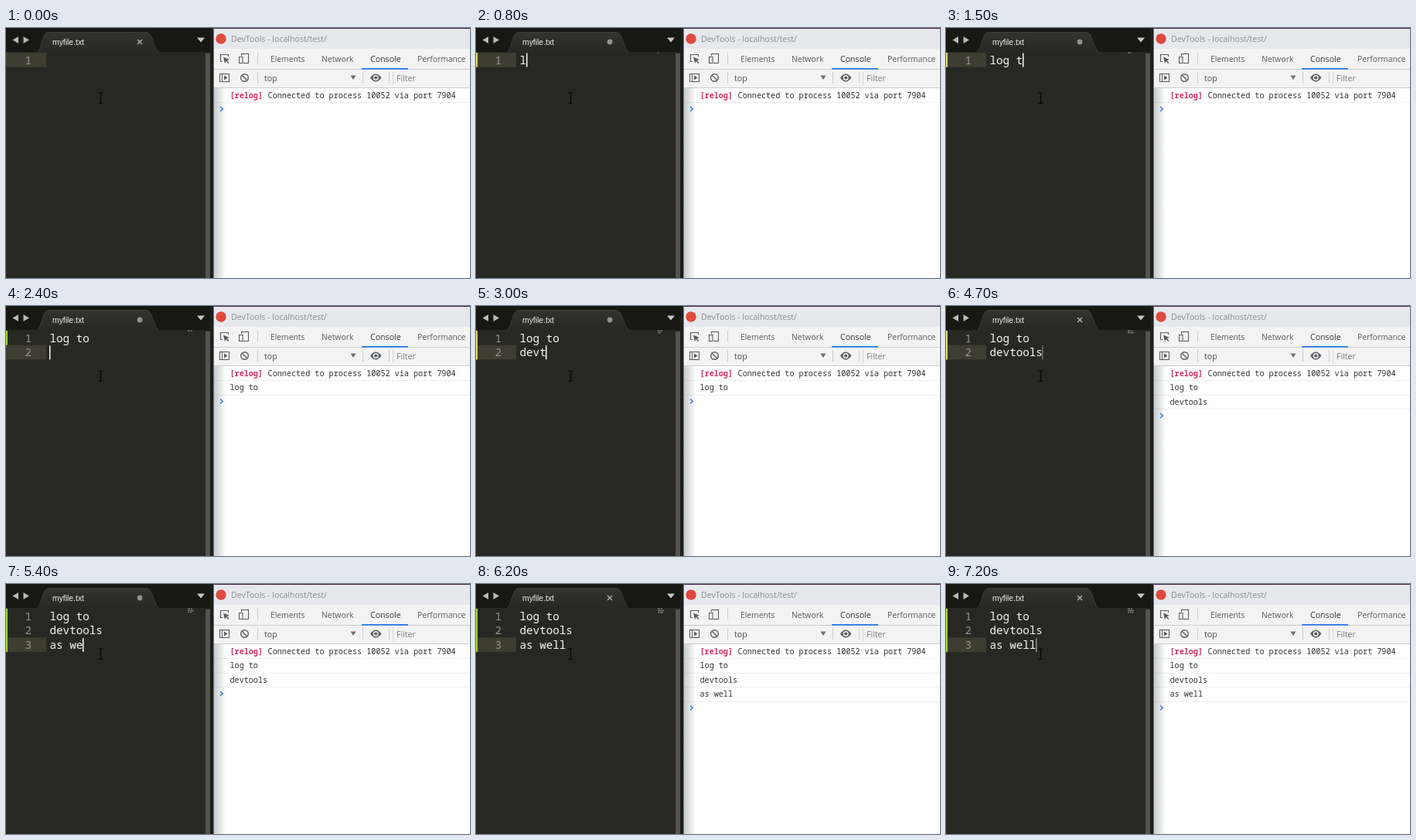
An HTML page with a canvas that plays this animation: 600 by 324 pixels, repeating every 7300 ms.

```html
<!DOCTYPE html>
<html lang="en">
<head>
<meta charset="utf-8">
<title>Editor and console</title>
<style>
html, body { margin: 0; width: 100%; height: 100%; overflow: hidden; background: #272822; }
canvas { display: block; width: 600px; height: 324px; }
</style>
</head>
<body>
<canvas id="stage" width="600" height="324"></canvas>
<script>
const ctx = document.getElementById('stage').getContext('2d');
const LOOP = 7300, STEP = 100, BLINK = 1240;
const UI = '"Open Sans", "Noto Sans", sans-serif';
const MONO = '"Noto Sans Mono", "DejaVu Sans Mono", monospace';
const CODE = '14.25px ' + MONO;
const CHAR = 8.55, LEFT = 56.5, PITCH = 18.7;

const TEXT = 'log to\ndevtools\nas well';
const KEYS = [
  700, 1000, 1100, 1300, 1500, 1600, 2300,
  2600, 2800, 2900, 3000, 3200, 3400, 3600, 3800, 4800,
  4900, 5000, 5100, 5200, 5400, 5500, 5650
];
const UNSAVED = [[700, 1900], [2300, 4000], [4800, 5900]];
const LOGGED = [2100, 4200, 6100];

function rect(x, y, w, h, color) {
  ctx.fillStyle = color;
  ctx.fillRect(x, y, w, h);
}

function text(s, x, y, font, color) {
  ctx.font = font;
  ctx.fillStyle = color;
  ctx.fillText(s, x, y);
}

function ui(s, x, y, size, color) {
  text(s, x, y, size + 'px ' + UI, color);
}

function poly(points, color) {
  ctx.beginPath();
  points.forEach(([x, y]) => ctx.lineTo(x, y));
  ctx.closePath();
  ctx.fillStyle = color;
  ctx.fill();
}

function line(points, color, width = 1) {
  ctx.beginPath();
  points.forEach(([x, y], i) => i ? ctx.lineTo(x, y) : ctx.moveTo(x, y));
  ctx.strokeStyle = color;
  ctx.lineWidth = width;
  ctx.stroke();
}

function disc(x, y, r, color) {
  ctx.beginPath();
  ctx.arc(x, y, r, 0, Math.PI * 2);
  ctx.fillStyle = color;
  ctx.fill();
}

function ring(x, y, r, color, width) {
  ctx.beginPath();
  ctx.arc(x, y, r, 0, Math.PI * 2);
  ctx.strokeStyle = color;
  ctx.lineWidth = width;
  ctx.stroke();
}

function box(x, y, w, h, color, width = 1) {
  ctx.strokeStyle = color;
  ctx.lineWidth = width;
  ctx.strokeRect(x, y, w, h);
}

function fade(x0, y0, x1, y1, from, to) {
  const g = ctx.createLinearGradient(x0, y0, x1, y1);
  g.addColorStop(0, from);
  g.addColorStop(1, to);
  return g;
}

function drawTabBar(unsaved) {
  rect(0, 0, 264, 31, '#171814');
  poly([[8.5, 15.5], [16, 11], [16, 20]], '#b9b9b5');
  poly([[30, 15.5], [22.5, 11], [22.5, 20]], '#b9b9b5');
  poly([[247, 12.5], [257, 12.5], [252, 18.5]], '#c9c9c5');

  ctx.beginPath();
  ctx.moveTo(39, 32);
  ctx.bezierCurveTo(47, 29, 46, 5.5, 55, 5.5);
  ctx.lineTo(181, 5.5);
  ctx.bezierCurveTo(191, 5.5, 190, 29, 199, 32);
  ctx.fillStyle = fade(0, 5, 0, 31, '#33342f', '#272822');
  ctx.fill();
  ctx.strokeStyle = '#3d3e38';
  ctx.lineWidth = 1;
  ctx.stroke();
  rect(0, 31, 264, 2, '#272822');

  text('myfile.txt', 60, 21.5, '10.4px "Liberation Sans", Arial, sans-serif', '#f0f0ec');
  if (unsaved) {
    disc(173, 18, 3.4, '#92928e');
  } else {
    line([[170, 15], [176, 21]], '#b0b0ac', 1.4);
    line([[176, 15], [170, 21]], '#b0b0ac', 1.4);
  }
}

function drawMarks(t, rows) {
  if (t < 700) return;
  const green = (t >= 2300 && t < 2600) || t >= 4800;
  const count = t === 4800 || (t >= 2300 && t < 2600) ? rows - 1 : rows;
  rect(0, 32, 2, count * PITCH, green ? '#a2d82e' : '#e3d56c');
}

function drawEditor(t) {
  const typed = KEYS.filter(k => k <= t).length;
  const rows = TEXT.slice(0, typed).split('\n');
  const last = rows.length - 1;
  rect(0, 0, 264, 324, '#272822');
  drawTabBar(UNSAVED.some(([a, b]) => t >= a && t < b));
  rect(0, 32 + last * PITCH, 52, 18.7, '#3e3d32');
  drawMarks(t, rows.length);

  rows.forEach((row, i) => {
    const y = 46.6 + i * PITCH;
    text(String(i + 1), 24.5, y, CODE, '#95968f');
    text(row, LEFT, y, CODE, '#f8f8f2');
    // minimap
    for (let c = 0; c < row.length; c++) {
      if (row[c] !== ' ') rect(235 + c, 31.5 + i * 2.3, 1, 1.5, '#74756f');
    }
  });

  const since = t - (typed ? KEYS[typed - 1] : -BLINK / 2);
  const glow = 0.5 + 0.8 * Math.cos(since / BLINK * Math.PI * 2);
  ctx.globalAlpha = Math.max(0, Math.min(1, glow));
  rect(Math.round(LEFT + rows[last].length * CHAR - 0.5), 32.6 + last * PITCH, 1.5, 18, '#f8f8f0');
  ctx.globalAlpha = 1;

  rect(258, 33, 6, 291, '#53534f');
  rect(264, 0, 4, 324, '#1d1f1d');

  // mouse pointer
  line([[122.5, 84.5], [122.5, 97]], '#050505', 1.3);
  for (const y of [84, 97.5]) line([[119.5, y], [125.5, y]], '#050505', 1);
}

function drawTabs() {
  const ink = '#5a5e62';
  rect(268, 0, 332, 27, '#e6e8ed');
  rect(268, 0, 332, 1, '#42243f');
  disc(278, 14, 6.7, '#de4a3c');
  ui('DevTools - localhost/test/', 291, 18, 10.6, '#8c8c8c');

  rect(268, 27, 332, 26, '#f3f3f3');
  rect(268, 53, 332, 1, '#cccccc');
  line([[280, 43.5], [277.5, 43.5], [277.5, 34.5], [287.5, 34.5], [287.5, 37]], ink, 1.2);
  poly([[281, 37.5], [289, 41], [285.8, 42], [288.5, 45], [287.3, 46], [284.6, 43], [283, 46]], ink);
  box(304.5, 33.5, 9, 12, ink, 1.1);
  rect(300, 36, 7, 11, '#f3f3f3');
  box(301.5, 37.5, 4.5, 8, ink, 1.1);
  rect(325, 32, 1, 15, '#cccccc');

  ui('Elements', 342, 43.5, 10.3, '#5a5a5a');
  ui('Network', 408, 43.5, 10.4, '#5a5a5a');
  ui('Console', 471, 43.5, 10.6, '#333333');
  ui('Performance', 532, 43.5, 10.3, '#5a5a5a');
  rect(460, 52, 60, 1.6, '#1a73e8');
}

function drawFilterBar() {
  const ink = '#5a5e62';
  rect(268, 54, 332, 23, '#f3f3f3');
  rect(268, 77, 332, 1, '#cccccc');
  box(276.5, 59.5, 12, 10, ink, 1.1);
  line([[279.5, 59.5], [279.5, 69.5]], ink, 1);
  poly([[282, 61.5], [286.5, 64.5], [282, 67.5]], ink);
  ring(308.5, 64.5, 4.8, ink, 1.4);
  line([[305.2, 61.2], [311.8, 67.8]], ink, 1.4);
  rect(325, 57, 1, 15, '#cccccc');
  ui('top', 334, 68.5, 10.7, '#4c4c4c');
  poly([[445.5, 61.5], [452.5, 61.5], [449, 67]], '#6e6e6e');
  rect(461, 57, 1, 15, '#cccccc');

  ctx.beginPath();
  ctx.moveTo(471, 64.5);
  ctx.quadraticCurveTo(478, 54.5, 485.5, 64.5);
  ctx.quadraticCurveTo(478, 74.5, 471, 64.5);
  ctx.fillStyle = ink;
  ctx.fill();
  disc(478.2, 64.5, 3.5, '#f3f3f3');
  disc(478.2, 64.5, 2.1, ink);

  rect(495, 57, 1, 15, '#cccccc');
  rect(500, 57, 1, 17, '#d4d4d4');
  ui('Filter', 505, 69, 10.6, '#7c7c7c');
}

function drawConsole(t) {
  const font = '10.13px ' + MONO;
  const pitch = 18.5;
  const count = LOGGED.filter(k => k <= t).length;
  rect(268, 78, 332, 246, '#ffffff');
  text('[relog]', 289.5, 90.5, 'bold ' + font, '#cf2f60');
  text('Connected to process 10052 via port 7904', 338.6, 90.5, font, '#303030');
  rect(268, 96, 332, 1, '#eeeeee');
  TEXT.split('\n').slice(0, count).forEach((row, i) => {
    text(row, 289.5, 109 + i * pitch, font, '#303030');
    rect(268, Math.round(96 + (i + 1) * pitch), 332, 1, '#eeeeee');
  });
  const y = 105 + count * pitch;
  line([[277, y - 3], [280.3, y], [277, y + 3]], '#3b82e0', 1.5);

  // soft shade and window edge on the left
  rect(268, 78, 16, 246, fade(268, 0, 284, 0, 'rgba(70, 75, 80, 0.32)', 'rgba(70, 75, 80, 0)'));
  rect(268, 0, 1, 324, '#3a86bd');
}

function draw(now) {
  const t = Math.floor((now % LOOP) / STEP) * STEP;
  drawEditor(t);
  drawTabs();
  drawFilterBar();
  drawConsole(t);
}

const start = performance.now();
function tick() {
  draw(performance.now() - start);
  requestAnimationFrame(tick);
}
tick();
</script>
</body>
</html>
```
